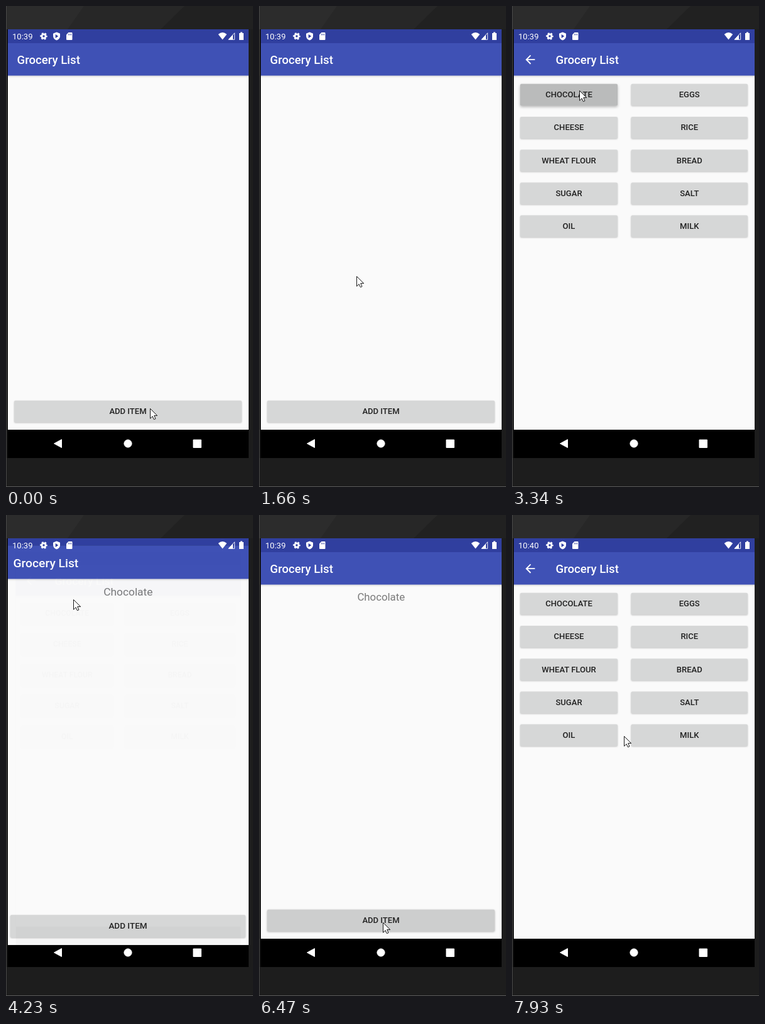
An HTML page that plays this animation: 393 px wide and 764 px high, repeating every 8 s.

```html
<!DOCTYPE html>
<html lang="en">
<head>
<meta charset="utf-8">
<title>Grocery List</title>
<style>
  html, body { margin: 0; width: 100%; height: 100%; overflow: hidden; background: #1d1d1d; }
  svg { display: block; width: 393px; height: 764px; }
  text { font-family: Roboto, sans-serif; }
  .title { font-size: 18.64px; font-weight: 500; fill: #fff; }
  .label { font-size: 13.05px; font-weight: 500; fill: #212121; text-anchor: middle; }
  .item { font-size: 16.8px; fill: #7a7a7a; text-anchor: middle; }
  .clock { font-size: 13.05px; fill: #fff; }
  .button { filter: drop-shadow(0 1px 1px rgba(0, 0, 0, .22)); }
</style>
</head>
<body>
<svg viewBox="0 0 393 764">
  <defs>
    <clipPath id="screen"><rect x="3" y="37" width="383" height="681"/></clipPath>
    <linearGradient id="shade" x2="0" y2="1">
      <stop stop-opacity=".13"/><stop offset="1" stop-opacity="0"/>
    </linearGradient>
  </defs>

  <!-- phone body -->
  <rect width="393" height="764" fill="#1d1d1d"/>
  <path d="M0 0H310L250 37H0z" fill="#272727"/>
  <path d="M0 0H124L98 37H0z" fill="#2c2c2c"/>
  <path d="M284 0H393V37H246z" fill="#212121"/>
  <path d="M1 37H3V718H1z" fill="#101010"/>
  <path d="M0 0H1V764H0z" fill="#484848"/>
  <path d="M0 763H393V764H0z" fill="#5c5c5c"/>

  <g clip-path="url(#screen)">
    <rect x="3" y="37" width="383" height="681"/>
    <g id="main"></g>
    <g id="list"></g>
  </g>

  <!-- status bar -->
  <g fill="#fff">
    <text id="clock" class="clock" x="10" y="53"></text>
    <g fill="none" stroke="#fff">
      <circle cx="60" cy="48" r="3.1" stroke-width="2.8"/>
      <circle cx="60" cy="48" r="4.9" stroke-width="1.8" stroke-dasharray="2.7 2.43" stroke-dashoffset="1.35"/>
    </g>
    <path d="M80.5 41.5l5.5 2.3v4c0 3.4-2.4 5.6-5.5 6.7c-3.1-1.1-5.5-3.3-5.5-6.7v-4z"/>
    <path d="M78.7 45v6l4.6-3z" fill="#303f9f"/>
    <path d="M99.5 42h5q1 0 1 1v10q0 1-1 1h-7.5q-1 0-1-1v-7.5z"/>
    <path d="M99.5 44v2.5M101.5 44v2.5M103.5 44v2.5" stroke="#303f9f" stroke-width=".8"/>
    <path d="M344.5 53.5L337.7 45q6.8-6 13.6 0z"/>
    <path d="M354 53.3H363.7V42.8z" fill="none" stroke="#fff" stroke-width=".9"/>
    <path d="M354 53.5H361V45.7z"/>
    <path d="M373 41.5h3v1.5h2v11h-7v-11h2z"/>
  </g>

  <!-- navigation bar -->
  <g fill="#fff" stroke="#fff" stroke-linejoin="round">
    <path d="M76.5 695L88.5 688.5V701.5z"/>
    <circle cx="194" cy="695" r="6.1"/>
    <rect x="298" y="689" width="12.5" height="12.5"/>
  </g>

  <path id="cursor" d="M.5.5V16.2l3.6-3.5 2.3 5 2.6-1.1-2.3-5h5z" fill="#fff" stroke="#000" stroke-width=".9"/>
</svg>

<script>
const LOOP = 8000;
const $ = id => document.getElementById(id);

// The screen refreshes in n even jumps, the first at `from`, the last at `to`.
function step(t, from, to, n) {
  const jumps = Math.floor((t - from) / (to - from) * (n - 1) + 1.1);
  return Math.max(0, Math.min(n, jumps)) / n;
}

const ease = p => (1 - Math.cos(Math.PI * p)) / 2;

// Pointer strokes: each glides on from where the last one ended.
const home = { x: 229, y: 639 };
const strokes = [
  { from: 1260, to: 1660, n: 4, x: 155, y: 429 },
  { from: 2230, to: 2740, n: 5, x: 107, y: 134 },
  { from: 4940, to: 5200, n: 3, x: 175, y: 549, bow: -46 },
  { from: 5330, to: 5480, n: 2, x: 187, y: 681 },
  { from: 5760, to: 6040, n: 3, x: 197, y: 647 },
  { from: 7210, to: 7510, n: 3, x: 220, y: 273 },
  { from: 7630, to: 7930, n: 3, x: 178, y: 351 }
];

function pointer(t) {
  let { x, y } = home;
  for (const s of strokes) {
    const p = ease(step(t, s.from, s.to, s.n));
    x += (s.x - x) * p + (s.bow || 0) * Math.sin(Math.PI * p);
    y += (s.y - y) * p;
  }
  return [x, y];
}

const button = (id, x, y, w, label) => `
  <g class="button" id="${id}">
    <rect x="${x}" y="${y}" width="${w}" height="34.5" rx="2" fill="#d6d7d7"/>
    <rect class="ink" x="${x}" y="${y}" width="${w}" height="34.5" rx="2" opacity="0"/>
  </g>
  <text class="label" x="${x + w / 2}" y="${y + 21.4}">${label}</text>`;

const page = (titleX, content) => `
  <rect x="3" y="37" width="383" height="681"/>
  <rect x="3" y="110" width="383" height="563" fill="#fafafa"/>
  <rect x="3" y="37" width="383" height="22" fill="#303f9f"/>
  <rect x="3" y="59" width="383" height="51.6" fill="#3f51b5"/>
  <rect x="3" y="110.6" width="383" height="3.4" fill="url(#shade)"/>
  <text class="title" x="${titleX}" y="92.3">Grocery List</text>${content}`;

const goods = ["CHOCOLATE", "EGGS", "CHEESE", "RICE", "WHEAT FLOUR", "BREAD", "SUGAR", "SALT", "OIL", "MILK"];
const grid = goods.map((name, i) =>
  button("good" + i, i % 2 ? 189.5 : 13, 123.8 + 52.2 * (i >> 1), i % 2 ? 185.5 : 155, name)).join("");
const back = `<path fill="#fff" transform="translate(17.8 74) scale(.932)"
  d="M20 11H7.83l5.59-5.59L12 4l-8 8 8 8 1.41-1.41L7.83 13H20z"/>`;

$("main").innerHTML = page(17.5,
  `<text id="item" class="item" x="194.3" y="136">Chocolate</text>` + button("add", 13, 626.8, 362, "ADD ITEM"));
$("list").innerHTML = page(69.5, back + grid);

function zoom(id, s) {
  $(id).setAttribute("transform", `translate(194.5 377.5) scale(${s}) translate(-194.5 -377.5)`);
}

function press(id, p) {
  const el = $(id);
  el.querySelector(".ink").setAttribute("opacity", p * .13);
  el.style.filter = p ? `drop-shadow(0 ${1 + p}px ${1 + p}px rgba(0,0,0,.28))` : "";
}

// The list grows in over the main page, then shrinks and fades to reveal it.
function pages(t) {
  const closing = step(t, 4230, 4510, 3);
  const opening = closing < 1 ? step(t, 1810, 1930, 2) : step(t, 7630, 7930, 3);
  const leaving = closing > 0 && closing < 1;
  zoom("main", leaving ? 1 + .0765 * (1 - closing) ** 2 : 1 + .05 * opening);
  zoom("list", leaving ? 1 - .195 * closing : .94 + .06 * opening);
  $("list").setAttribute("opacity", leaving ? (1 - closing) ** 10 : Math.ceil(opening));
  $("item").setAttribute("opacity", Math.ceil(closing));
}

function draw(t) {
  pages(t);
  $("cursor").setAttribute("transform", `translate(${pointer(t)})`);
  press("add", t < 1260 ? step(t, 570, 710, 2) : t < 7210 ? step(t, 6470, 6770, 3) : 0);
  press("good0", t < 4080 ? step(t, 3190, 3340, 2) : 0);
  $("clock").textContent = t < 7780 ? "10:39" : "10:40";
}

const start = performance.now();
function frame() {
  draw((performance.now() - start) % LOOP);
  requestAnimationFrame(frame);
}
frame();
</script>
</body>
</html>
```
